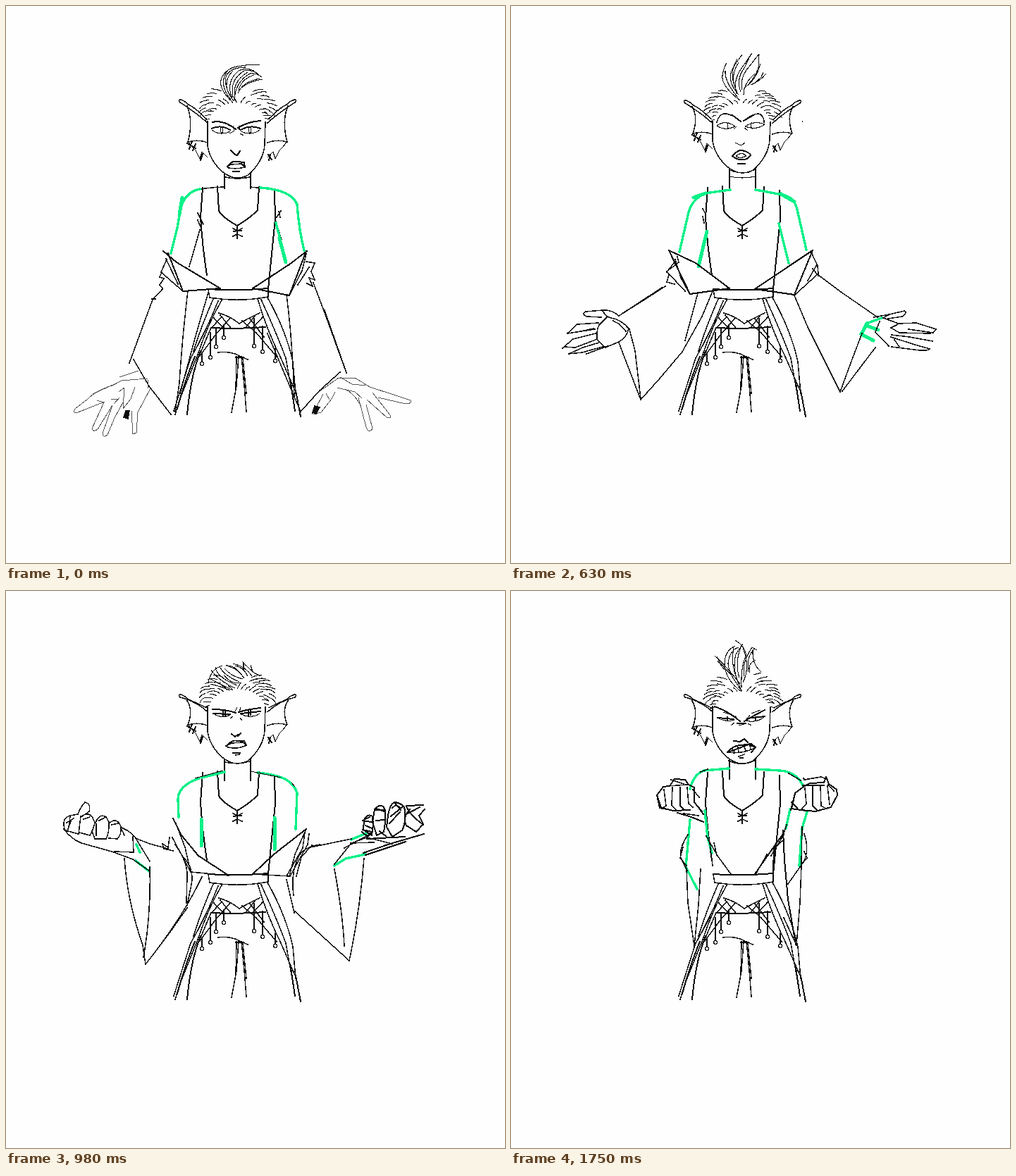
An HTML page that plays this animation: 708x791 px, repeating every 1890 ms.

```html
<!DOCTYPE html>
<html lang="en">
<head>
<meta charset="utf-8">
<title>Sketch: gesture loop</title>
<style>
  html, body { margin: 0; width: 100%; height: 100%; overflow: hidden; background: #fefefe; }
  svg { display: block; width: 708px; height: 791px; }
  path { fill: none; stroke: #0b0b0b; stroke-width: 1.5; stroke-linecap: round; stroke-linejoin: round; shape-rendering: crispEdges; }
  .thin { stroke-width: 1.1; }
  .bold { stroke-width: 2; }
  .pale { stroke: #555; stroke-width: 1; }
  .green { stroke: #0af088; stroke-width: 3.4; }
  .wide { stroke: #0af088; stroke-width: 5; }
  .solid { fill: #0b0b0b; }
</style>
</head>
<body>
<svg id="stage" viewBox="0 0 708 791"></svg>
<script>
const LOOP = 1890;
const stage = document.getElementById('stage');

function add(parent, tag, attrs = {}) {
  const el = document.createElementNS('http://www.w3.org/2000/svg', tag);
  for (const key in attrs) el.setAttribute(key, attrs[key]);
  return parent.appendChild(el);
}

const draw = (parent, parts) => parts.forEach(([style, d]) => add(parent, 'path', { class: style, d }));

function randomFrom(seed) {
  return () => (seed = (seed * 16807) % 2147483647) / 2147483647;
}

function onEllipse(cy, rx, ry, deg) {
  const a = deg * Math.PI / 180;
  return `${(328 + rx * Math.cos(a)).toFixed(1)} ${(cy + ry * Math.sin(a)).toFixed(1)}`;
}

// Cropped hair: a ragged rim on both sides and loose tufts along the hairline.
function croppedHair(cy) {
  const rnd = randomFrom(7100 + cy);
  let d = '';
  for (const [from, to] of [[172, 238], [368, 302]]) {
    const dir = Math.sign(to - from);
    for (let a = from; (to - a) * dir > 0; a += dir * (7 + rnd() * 5)) {
      const out = rnd() * 5;
      d += `M${onEllipse(cy, 46, 33, a + dir * 9)}Q${onEllipse(cy, 52, 38, a + dir * 5)} ${onEllipse(cy, 53 + out, 38 + out, a - dir * 2)}`;
      if (rnd() < .6) d += `M${onEllipse(cy, 38, 27, a + dir * 8)}Q${onEllipse(cy, 43, 30, a + dir * 5)} ${onEllipse(cy, 43 + out, 30 + out, a)}`;
    }
  }
  for (let a = 190; a < 352; a += 8 + rnd() * 4) {
    const len = 4 + rnd() * 6, lean = a < 270 ? -6 : 6;
    d += `M${onEllipse(cy + 15, 40, 28, a)}Q${onEllipse(cy + 15, 42, 32, a + lean / 3)} ${onEllipse(cy + 15, 40 + len, 28 + len, a + lean)}`;
  }
  return d;
}

function ear(tip, mid) {
  const root = tip * .4 + 112;
  return [
    ['', `M286 ${root}Q268 ${root - 16} 247 ${tip + 2}q-4 -4 1 -4q6 2 11 7Q268 ${tip + 9} 284 ${root - 6}`],
    ['', `M257 ${tip + 7}Q266 ${(tip + mid) / 2} 258 ${mid}Q273 ${mid - 4} 286 ${mid + 1}`],
    ['thin', `M259 ${mid}Q264 ${mid + 8} 269 ${mid + 12}L275 ${mid + 24}L278 ${mid + 14}L286 ${mid + 22}`]
  ];
}

function head({ ear: [tip, mid], chin, crown, neck }, g) {
  const side = ear(tip, mid);
  draw(g, side);
  draw(add(g, 'g', { transform: 'translate(657) scale(-1 1)' }), side);
  draw(g, [
    ['bold', `M257 ${mid + 2}l12 7M260 ${mid + 10}l4 -11M265 ${mid + 12}l4 -9M276 ${mid + 26}l3 -9M372 ${mid + 18}l5 7M373 ${mid + 26}l2 -8`],
    ['', `M286 164V${chin - 46}Q289 ${chin - 24} 308 ${chin - 8}Q318 ${chin} 328 ${chin}Q341 ${chin} 348 ${chin - 8}Q366 ${chin - 27} 367 ${chin - 47}L368 165`],
    ['', `M310 ${chin - 6}V${neck}M347 ${chin - 6}V${neck}`],
    ['thin', croppedHair(crown)]
  ]);
}

const beads = [[278, 494, 508], [290, 464, 499], [298, 458, 484], [309, 453, 471], [352, 444, 483], [364, 455, 491], [382, 486, 504]];

const body = [
  ['bold', 'M300 256L302 291Q307 300 328 312Q345 302 357 290L359 257'],
  ['bold', 'M279 258L276 300Q279 345 285 382M381 262L382 302Q377 350 372 402'],
  ['', 'M328 312V330M322 316l6 3l7 -3M322 327l6 -3l7 3M323 320l11 -1'],
  ['bold', 'M287 402Q328 405 372 401'],
  ['', 'M372 401V413Q330 421 289 414L287 402'],
  ['', 'M302 436Q317 440 331 451Q346 442 360 436'],
  ['bold', 'M291 457Q330 459 368 456'],
  ['', 'M306 418Q287 450 272 495L246 560L240 580M301 419Q284 462 262 500L238 575M294 416Q277 455 266 490'],
  ['bold', 'M276 490Q262 525 257 580M268 498Q252 537 243 572'],
  ['', 'M357 416Q370 460 390 500L411 548M362 417Q382 460 397 500L405 545M371 414Q397 460 407 505L411 550'],
  ['bold', 'M404 535L410 575M411 546L418 583'],
  ['', 'M295 443L308 457M304 439L318 456M306 441L290 459L274 497M317 444L298 466L275 497'],
  ['', 'M335 447L355 464L384 498M346 444L366 470M353 440L340 457M364 442L349 458'],
  ['', 'M301 492Q312 490 325 494L343 502M326 499H337'],
  ['', 'M327 498L326 545L320 577M330 498L327 540M334 498Q338 535 341 576M336 500L341 550'],
  ['', beads.map(([x, top, y]) => `M${x} ${top}V${y - 3}a2.4 2.8 0 1 0 .1 0`).join('')]
];

const poses = [
  { at: 0, ear: [135, 193], chin: 244, crown: 150, neck: 259, parts: [
    ['thin', 'M322 137Q298 115 307 100Q315 86 335 85Q347 82 360 84M323 135Q307 112 313 98Q320 87 340 87M321 131Q311 108 330 92Q340 87 352 92M322 128Q317 105 338 92Q350 90 358 97'],
    ['thin', 'M324 134Q325 108 346 96Q356 95 363 101M329 124Q335 108 360 103M334 116Q345 107 364 104M318 128Q306 108 322 92M325 130Q320 108 343 94M319 133Q300 110 315 91M330 120Q333 104 352 98'],
    ['bold', 'M293 165Q308 161 326 175M329 173Q344 164 361 163M292 174Q304 168 318 176M333 176Q347 168 361 174'],
    ['thin', 'M292 176Q304 185 318 178M333 178Q348 185 360 176M306 171q-3 5 0 10q4 -5 0 -10M346 171q-3 5 0 10q4 -5 0 -10M317 181l6 -3M332 181l5 3M322 170l2 8M331 170v6'],
    ['bold', 'M319 205L325 211L328 212L332 206M314 228Q321 219 327 221L338 222L339 229'],
    ['', 'M314 228L319 225L334 224L339 229Q327 232 316 230ZM322 235h9M311 243Q328 247 346 243'],
    ['', 'M309 257Q282 258 266 262M347 257L384 261M275 318L260 370M383 306L391 332M272 294l8 16M384 300l6 -9M272 304l5 12M387 292l2 8'],
    ['green', 'M275 260Q254 264 248 287L243 315L234 351M361 258Q405 261 413 282Q416 320 423 347M383 308L390 335'],
    ['wide', 'M388 330L397 364M250 272L246 296'],
    ['bold', 'M223 348L242 364L304 401L251 405L230 351M427 348L402 367L350 401L402 411L426 348'],
    ['', 'M228 360L220 378L251 405M227 359L244 395M221 378l-3 7l6 2l-6 9l4 5M426 352L420 376L402 411M426 363l12 2l-5 12l5 12l-8 -3l5 12l-8 -4M430 371l-16 25'],
    ['', 'M222 402L208 417L175 507M207 416h5M181 502L203 540L234 580M258 405Q250 470 246 535L240 576M287 407L270 465L247 550M436 393L450 430L483 521M452 432L481 515M398 410Q406 470 409 555M474 520L445 546L418 576L409 555L371 465'],
    ['pale', 'M201 529L164 532L149 540M188 518L161 527M155 537Q126 547 116 558L98 572q-4 7 4 5L140 562M129 560L139 563L122 600q2 6 8 1L151 567'],
    ['pale', 'M151 567L137 607q1 7 7 2L154 585L166 563M160 548l8 -6l-2 29M183 541L177 558L166 572M178 575L180 608L185 606L187 577L205 543M201 531V543M149 558l11 1M153 565l8 -9M147 540l-24 11'],
    ['pale', 'M445 547L472 528L495 528L516 541L550 552L574 560q2 5 -7 5L528 556M520 549L545 581q3 6 -5 3L512 559M500 556L511 598q4 10 9 2L511 566'],
    ['pale', 'M474 527l17 10l19 2M480 544Q492 548 502 565M450 551L438 574L434 580M467 548L462 558L447 577L436 580M454 550L459 559M470 542l25 6l10 9'],
    ['solid', 'M170 575L175 575L173 586L167 584ZM438 568L445 570L440 579L435 577Z']
  ] },
  { at: 280, ear: [143, 188], chin: 239, crown: 149, neck: 262, parts: [
    ['thin', 'M322 137Q301 117 308 95Q314 75 329 69M322 134Q307 108 315 90Q322 75 333 72M321 130Q313 105 325 88Q338 72 356 69M325 133Q311 100 330 81L345 70'],
    ['thin', 'M323 128Q320 102 340 84Q356 72 379 75M329 121Q327 98 346 85Q360 77 379 76M333 115Q335 97 350 88L367 82M338 109Q342 96 364 82M320 127Q307 105 312 90M318 122Q311 95 332 76M345 107L352 98L364 108'],
    ['', 'M295 162Q307 153 326 160M330 164Q344 153 361 161M290 170Q305 158 319 170Q306 178 290 171M330 170Q346 158 362 168Q347 178 330 170'],
    ['thin', 'M306 165q-4 5 0 9q4 -4 0 -9M346 164q-4 5 0 10q4 -5 0 -10M319 199L326 203L334 199M322 174l-5 3M364 175l-4 4'],
    ['bold', 'M315 219L324 212L339 216L335 221L318 223ZM316 219L339 217'],
    ['', 'M324 229h8M310 243Q328 247 346 243M309 236l7 3M338 238l9 -4'],
    ['thin', 'M264 276L285 268L310 265M267 275L275 304M270 278L277 290M268 262L310 257M347 260L394 264M386 259L394 261Q411 278 413 290'],
    ['green', 'M310 261L264 264Q248 276 244 303L234 352M275 317L260 365M347 260L383 261Q401 261 409 283L418 325L424 349M383 313L394 363'],
    ['wide', 'M381 310L386 328M286 263L303 262'],
    ['bold', 'M221 346L250 359L310 402L252 406L221 346M431 345L400 363L345 402L402 408L431 345'],
    ['', 'M229 356L239 383L251 404M226 352L244 400M222 360L212 374L218 382L211 382L217 391M429 349L440 356L425 380L403 408M433 360L437 370L428 379M438 365l1 8l-9 9l12 1'],
    ['', 'M216 392L204 407L160 457L207 574L241 482L252 407M287 407L243 493L206 574M265 407L254 455M402 409Q422 460 428 482L436 535M442 385L476 430L514 472L441 552M502 492L456 532'],
    ['', 'M172 487L150 495L117 508M182 514L164 520M119 504L152 496L168 488L174 493L163 518M120 505L127 517L160 513L166 522L134 525L117 512M144 494l13 -4M146 507l14 -2l8 12'],
    ['', 'M127 520Q108 535 92 552L98 555L119 539L138 526M110 535l10 3M133 529L114 557L111 582L121 573L139 530M142 529L129 568L132 572L143 552L149 528M151 527L146 578L153 572L159 531'],
    ['pale', 'M126 525L97 552M138 532L115 575M146 530L132 565M156 530L149 575M129 533L103 550M134 541L115 561M153 537L146 565M154 528L158 551L152 575'],
    ['', 'M497 487L521 496L528 508M486 510L496 516M488 507Q500 500 515 498L522 512L489 520M505 485l6 13M508 490l11 12M489 522l11 -3l21 5'],
    ['', 'M523 503L545 526L569 540Q558 543 540 535L520 524M528 507l20 17M523 524L548 554L553 563L541 556L515 526M513 525L535 557L540 562L532 558L508 526M506 525L520 562L516 568L508 553L501 525M496 524L502 549L506 553L510 543'],
    ['pale', 'M520 514L552 536M524 523L548 555M513 527L534 557M506 527L518 561M501 526L507 550M525 512L561 538M515 520L539 551']
  ] },
  { at: 630, ear: [136, 181], chin: 237, crown: 151, neck: 260, parts: [
    ['thin', 'M325 134Q298 114 300 98Q302 87 306 81M322 130Q303 108 304 92M323 126Q307 108 313 92Q319 80 328 69M321 122Q309 102 323 80M320 125Q315 106 326 90L342 67'],
    ['thin', 'M326 122Q319 104 331 88L340 69M328 119Q324 102 338 86L352 68M330 118Q345 105 351 88L352 69M334 114Q348 104 354 82M340 112Q352 108 362 96M344 111L355 101L358 94M330 126Q330 110 346 96M318 115Q309 96 321 75'],
    ['', 'M292 165Q296 151 306 153Q318 156 326 164M330 163Q347 150 354 154Q359 158 359 165'],
    ['bold', 'M314 155L326 164M330 163L344 155'],
    ['thin', 'M292 170Q304 161 318 171Q304 178 292 170M332 171Q346 162 360 168Q348 177 332 171M309 165q-4 5 0 10M342 165q-4 5 1 10M316 175l4 -4M331 173l5 4M318 194l6 3l3 1l5 -4'],
    ['bold', 'M314 213Q322 204 328 205Q339 208 340 212L335 217Q323 221 314 213'],
    ['thin', 'M319 213Q327 206 334 213Q324 218 319 213M321 224h12M310 242Q328 246 347 242M309 232l8 4M335 237l12 -5M413 164h.5'],
    ['green', 'M311 261L276 266Q257 274 252 293L239 349M347 261L385 268Q402 271 406 289L419 346M380 309L394 365M504 451L526 443'],
    ['wide', 'M278 320L266 370M259 272l17 -6M383 267L402 278M505 451L497 466L514 475M505 454L521 460'],
    ['bold', 'M224 347L262 365L310 401L254 409L224 347M428 347L401 365L346 402L402 410L428 347'],
    ['', 'M236 356L238 364L221 377L247 405M231 365L221 378M224 382l-3 10l11 3M233 360L241 386L253 408M276 295l-4 -7M272 299l2 9M427 352L435 369L436 380L403 410M433 369L421 390M428 373l8 10'],
    ['', 'M219 398L188 418L153 440M214 400L159 436M168 459L176 490L184 557M153 478L184 559L211 529L243 491L271 441L286 405M265 408L247 475M436 382L468 406L520 442M402 411L421 456L467 548M498 465L482 507L467 548M517 485L470 547'],
    ['', 'M153 440Q143 431 130 432L106 434q-7 4 2 7L128 442M130 433q5 9 12 10q14 2 25 15Q165 470 153 477L134 485Q126 478 122 473Q121 460 125 453L136 442'],
    ['', 'M124 450L94 452L80 465L119 459M120 465L88 473L73 486M120 474L91 485L76 484M125 478L102 485L82 494L101 492L130 484M137 483L107 494M94 463l23 -5M145 447l9 5l9 10'],
    ['', 'M515 442L537 438L558 433q5 2 -3 8L535 444M537 438L528 443L550 451L575 450L603 459L599 464L564 459M549 452L539 457L551 464L595 465M540 467L565 470L598 476M539 470L573 481L594 487q-2 3 -14 2L540 484M544 474l7 10M523 448l-6 15l19 20']
  ] },
  { at: 980, ear: [149, 190], chin: 245, crown: 152, neck: 269, parts: [
    ['thin', 'M287 131Q290 111 307 106M291 112Q301 127 325 138M297 108Q299 123 328 134M303 107Q309 120 331 129M310 110Q319 121 336 125M316 107Q330 111 338 124'],
    ['thin', 'M325 106Q337 108 343 121M335 100Q346 112 355 118M322 103Q340 107 349 121M288 124Q305 133 322 141M290 132Q304 135 318 141M347 105L350 115L361 121M312 106Q325 105 334 119M309 119Q320 134 334 130M337 101L337 113'],
    ['bold', 'M293 168Q312 168 326 173M330 172Q343 168 361 166M294 174L318 175M333 174L361 171M320 203L325 207L329 204M333 202l-4 4'],
    ['thin', 'M294 174Q307 182 318 176M333 175Q348 182 360 174M308 169v10M311 170v8M344 169v10M347 169v8M318 181l4 -3M332 180l3 4M328 165l-4 8M333 165l-2 7'],
    ['', 'M312 220Q321 211 327 213L338 213L341 219M312 220L320 216L336 215L341 219Q330 225 315 222ZM322 230h10M326 233l5 -1M311 243Q328 247 346 242'],
    ['green', 'M310 257L278 265M274 266Q245 276 244 295L245 321M357 258Q380 260 396 267Q409 274 413 287L411 338M466 390L482 380L510 374M490 353L511 344M185 360L190 371M184 383L203 398'],
    ['wide', 'M277 324L277 362M381 322L381 367'],
    ['thin', 'M268 266L308 255M347 256L390 265M405 272l5 6'],
    ['bold', 'M237 323L249 347L273 376L316 404M426 338L380 374L350 402'],
    ['', 'M241 330L254 364L262 399L316 404M426 338L410 374L402 405L350 402M236 350L246 369L262 399M232 350l-2 14l-8 -5l2 7l13 3M240 360Q258 385 257 405L256 443M250 376Q268 394 263 417L257 446M430 345L428 360L403 405M424 343L421 365L399 403M445 360Q420 364 414 380Q404 402 408 432M434 361L419 378L412 405'],
    ['', 'M186 352L204 359L230 366M168 380Q172 440 194 503M204 392Q206 460 195 520M194 503L198 530Q230 490 257 450M278 406Q250 465 198 530M432 364L466 357L490 352M466 395Q478 460 480 504M508 380Q502 455 487 525M410 455L487 525M398 410L409 457'],
    ['', 'M82 338Q92 352 107 358L150 370L180 381L204 398M164 336Q181 343 187 356L204 384M83 338Q79 322 91 319L102 317Q106 306 112 300Q121 302 118 313L108 320M91 320Q90 333 87 341M106 320L103 345M154 370l27 1l-1 -22'],
    ['', 'M106 321Q116 312 123 322L126 329Q123 342 119 347L104 343M127 329Q133 315 142 321L146 328Q147 342 142 352L126 352L122 341M146 330Q158 320 163 335Q164 346 158 352L146 351M85 340l17 5M86 329l10 -6M92 327l-5 14M163 336l5 11M128 331V347M132 326l8 -4M110 324l9 -3M150 332l9 -2'],
    ['bold', 'M508 326Q512 315 520 320L521 331L519 347L507 339ZM523 310Q532 300 537 309Q540 321 536 342L526 347L520 328ZM542 319Q545 300 553 300Q566 303 566 312Q568 328 562 340L548 349L540 335ZM568 305L592 304M568 306Q573 318 592 332M573 310Q562 322 568 333L582 342L592 331L586 319L594 310'],
    ['bold', 'M505 342l8 7l6 -7l-13 -3M516 321l-10 5l12 2M526 309l10 4M525 311h13M546 320l16 -13M552 301l8 10M525 326l13 -1M544 330l15 -16M570 316l17 -9M530 341l9 7M512 352l54 -3M548 308l5 -4l7 4M510 333l9 4'],
    ['bold', 'M593 345L545 359L507 372M510 375L567 356'],
    ['', 'M466 388L490 358L512 350L548 359M480 365L515 346M489 358L522 357']
  ] },
  { at: 1260, ear: [148, 193], chin: 246, crown: 157, neck: 267, parts: [
    ['thin', 'M325 141Q300 120 306 102Q309 89 318 86M324 137Q308 119 313 104Q317 92 328 86M306 109Q310 88 335 86Q351 89 354 108M325 138Q314 116 322 97L335 86'],
    ['thin', 'M327 137Q319 114 331 94M329 135Q326 109 337 92M331 133Q334 110 343 94M334 131Q345 112 346 96M337 127Q351 115 352 100M340 121L356 111L351 105M322 132Q303 115 316 93M328 121Q337 108 332 88M346 120L357 118'],
    ['bold', 'M294 169Q309 172 325 181M330 181Q343 177 362 171M295 178L319 181M333 181L361 176M317 208L324 214L329 209L335 213'],
    ['thin', 'M295 178Q307 184 319 182M334 182Q348 186 360 178M307 175v6M347 175v7M319 174l4 6M336 174l-3 6M316 186l4 -3M324 185h9M301 167Q306 162 316 167M338 167l17 -1M321 187l9 -1'],
    ['bold', 'M314 221L324 218L340 215L345 211L347 216L341 222'],
    ['', 'M314 221Q327 225 341 222M319 222l20 -4M323 230l8 1l5 -4M325 235l8 -2M310 242Q328 250 348 241'],
    ['green', 'M310 257L257 267Q246 272 247 292L250 326M347 255L400 264Q411 269 410 290L406 327M280 308L282 364M377 332L381 311'],
    ['wide', 'M217 356L241 403M438 360L415 408'],
    ['bold', 'M248 326L267 348L302 403L275 402L249 328M415 328L400 345L350 403L378 410L411 350L415 328'],
    ['', 'M252 340L265 375L275 401M247 337L261 382M243 353L271 383M214 336L242 354M414 332L418 345L385 397M409 329L396 364L365 404M416 348L388 379L379 408'],
    ['', 'M212 350Q210 390 217 451L228 517L239 499L268 459M243 352L242 404L234 491M268 394Q272 408 267 420L264 437L273 431L274 407M230 334L248 357L276 381M276 409L242 496L228 514M441 358Q450 390 444 470L431 528L414 490L398 455M413 399L416 446L430 525M388 394Q383 410 391 418L394 401L388 394M386 410L414 489'],
    ['bold', 'M158 331L151 323L144 293L154 290L157 281L169 282L174 276L185 281L184 289L197 293L203 306L214 309L221 329M157 331L187 333L222 343L217 322M161 322L187 321L195 319'],
    ['', 'M146 293L156 300L154 321M164 287L162 316L168 322M171 288L172 316L177 322M182 288L184 317L192 320M157 288L178 286M190 293L195 312M187 332l25 10M221 317L231 333L227 342M164 281l20 5l2 -5'],
    ['bold', 'M439 309L441 291L455 291L463 281L470 274L478 282L481 287L492 287L498 293L496 319L479 320L450 318ZM437 321L428 337L413 351M466 329L450 335L435 344L400 380'],
    ['', 'M451 292L454 314M462 290L465 315M472 290L473 318M485 289L486 317M461 281L469 287L483 289M441 295l10 5M443 319L466 321L486 317M437 321l29 8l-20 10M446 322l2 8']
  ] },
  { at: 1540, ear: [149, 193], chin: 245, crown: 155, neck: 267, parts: [
    ['thin', 'M327 143Q304 126 303 104Q303 85 318 78M327 140Q309 119 308 103Q310 84 323 80M325 136Q313 112 319 90L329 75M325 132Q306 107 289 92M327 137Q326 106 334 91Q331 77 318 70'],
    ['thin', 'M312 119L296 101L292 93M329 130Q340 108 329 81M331 121Q327 103 342 80L349 84M337 115Q333 94 346 81M339 116Q335 103 347 98M343 84Q342 104 355 115M321 127Q311 103 316 80M324 123Q317 102 327 77M303 112L293 99M344 119L355 116'],
    ['bold', 'M289 164Q309 171 325 185M331 185Q344 177 360 169M293 180L316 182M335 181L360 178M316 213L325 214L331 210L336 215'],
    ['thin', 'M293 180Q306 187 317 183M333 184Q348 188 359 179M307 178v7M347 178v7M318 177l5 7M339 176l-5 8M320 188h14M323 191l8 -2M301 172l15 5M341 174l13 -5M317 187l-5 4M336 188l5 3'],
    ['bold', 'M307 229Q315 219 326 219L341 217L347 222L341 229M308 229L319 225L337 218L344 221'],
    ['', 'M307 229Q325 232 344 224M314 224l3 5M322 222l1 6M331 220l2 7M339 219l1 6M323 235l8 -3M325 237h4M309 241Q328 250 347 240'],
    ['green', 'M309 252L274 255Q259 260 254 281M347 253L381 255Q404 256 414 276M254 325L250 370L248 392L264 423M275 312L279 350L285 372M396 310L390 337M420 314L413 337L409 390'],
    ['', 'M279 253L269 257M394 259l17 10M251 346Q238 366 241 379L250 397M244 364l-4 15l9 11M249 394L251 443L260 504M269 395L266 446L260 504L282 464M277 348L293 376L312 402M281 350L286 390M288 358l4 17'],
    ['bold', 'M346 402Q361 380 386 345M373 365L372 399M386 340L388 382L393 438L404 502'],
    ['', 'M387 346L369 376M373 365L385 355M416 345Q424 368 415 385L393 416M413 335L412 390L410 443L405 503L387 464M416 370l4 9l-7 8M386 347l5 -15M363 374L348 401'],
    ['bold', 'M211 308L207 290L216 278L225 277L232 267L247 268L252 275L260 279L260 300L271 313M207 290L213 308L230 312L254 311M236 315L256 321L273 328M265 306l8 11'],
    ['', 'M217 282L220 305L214 309M229 279L228 304L234 311M240 279L240 305L246 311M250 279L252 302L258 307M222 277L251 275M227 268l18 6M258 282l9 11M245 316l21 3'],
    ['bold', 'M397 311L403 287L415 278L424 273L444 272L447 264L451 274L462 282L463 290L454 307L432 313L412 311M414 276h30M403 288L398 309L418 312'],
    ['', 'M416 268L440 264L449 268M417 280L419 302L413 309M428 276L428 305L435 312M439 277L440 305L447 309M449 277L452 303M398 300l8 8M458 284L450 275M415 266l3 2']
  ] }
];

draw(add(stage, 'g'), body);

const layers = poses.map(pose => {
  const g = add(stage, 'g');
  head(pose, g);
  draw(g, pose.parts);
  return g;
});

const origin = performance.now();

function show() {
  const time = (performance.now() - origin) % LOOP;
  const current = poses.findLastIndex(pose => pose.at <= time);
  layers.forEach((g, i) => g.setAttribute('visibility', i === current ? 'visible' : 'hidden'));
  requestAnimationFrame(show);
}
show();
</script>
</body>
</html>
```
